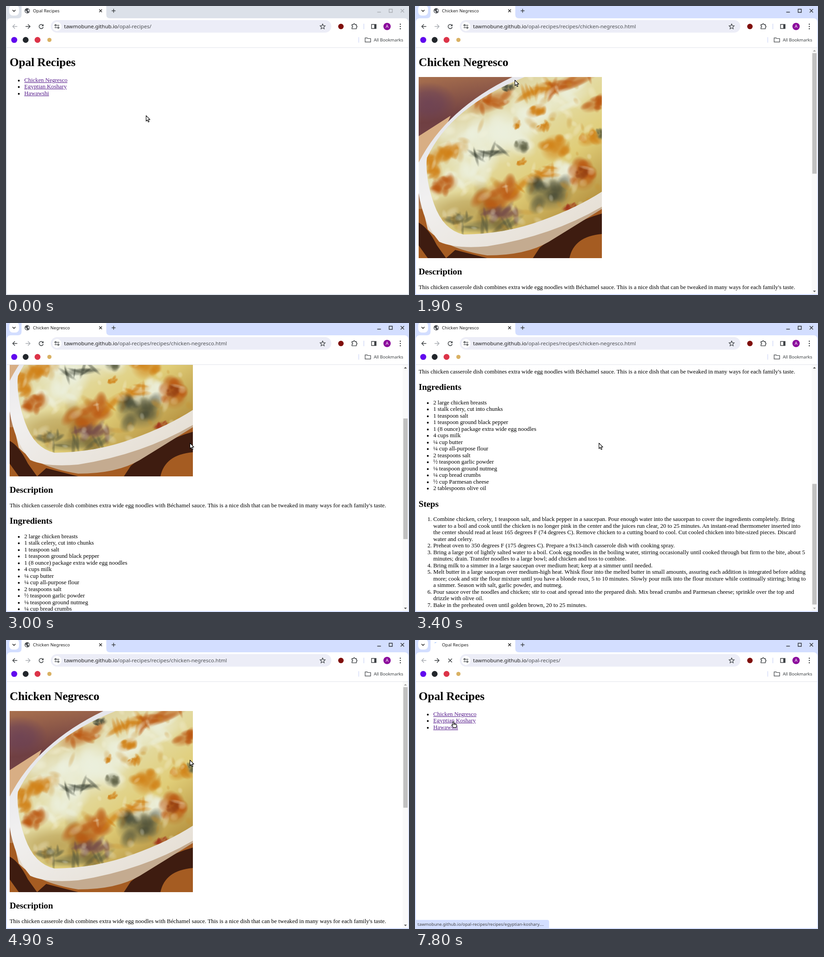
An HTML page with a canvas for the animation above (8000 ms loop, 882 px wide and 635 px high).

```html
<!DOCTYPE html>
<html lang="en">
<head>
<meta charset="utf-8">
<title>Opal Recipes</title>
<style>
html, body { margin: 0; width: 100%; height: 100%; overflow: hidden; background: #fff; }
#ui, #top { position: absolute; left: 0; top: 0; }
#view { position: absolute; left: 1.6px; top: 91.6px; width: 866.4px; height: 541.4px; overflow: hidden; }
.page { position: absolute; left: 0; top: 0; width: 853.6px; padding: 0 6.4px; display: flow-root;
  font: 12.84px/14.5px "Liberation Serif", "Times New Roman", serif; color: #000; }
h1 { font-size: 25.6px; line-height: 30px; margin: .67em 0; }
h2 { font-size: 19.2px; line-height: 21.6px; margin: .83em 0; }
p, ul, ol { margin: 12.8px 0; }
ul, ol { padding-left: 32px; }
.page > h1 + ul { margin-top: 0; }
a { color: #551a8b; text-decoration: underline; }
</style>
</head>
<body>
<canvas id="ui" width="882" height="635"></canvas>
<div id="view">
  <div class="page" id="index">
    <h1>Opal Recipes</h1>
    <ul>
      <li><a>Chicken Negresco</a></li>
      <li><a>Egyptian Koshary</a></li>
      <li><a>Hawawshi</a></li>
    </ul>
  </div>
  <div class="page" id="recipe">
    <h1>Chicken Negresco</h1>
    <canvas id="photo" width="401" height="398" style="width:401px;height:398px"></canvas>
    <h2>Description</h2>
    <p>This chicken casserole dish combines extra wide egg noodles with Béchamel sauce. This is a nice dish that can be tweaked in many ways for each family's taste.</p>
    <h2>Ingredients</h2>
    <ul>
      <li>2 large chicken breasts</li>
      <li>1 stalk celery, cut into chunks</li>
      <li>1 teaspoon salt</li>
      <li>1 teaspoon ground black pepper</li>
      <li>1 (8 ounce) package extra wide egg noodles</li>
      <li>4 cups milk</li>
      <li>¼ cup butter</li>
      <li>¼ cup all-purpose flour</li>
      <li>2 teaspoons salt</li>
      <li>½ teaspoon garlic powder</li>
      <li>⅛ teaspoon ground nutmeg</li>
      <li>¼ cup bread crumbs</li>
      <li>½ cup Parmesan cheese</li>
      <li>2 tablespoons olive oil</li>
    </ul>
    <h2>Steps</h2>
    <ol>
      <li>Combine chicken, celery, 1 teaspoon salt, and black pepper in a saucepan. Pour enough water into the saucepan to cover the ingredients completely. Bring water to a boil and cook until the chicken is no longer pink in the center and the juices run clear, 20 to 25 minutes. An instant-read thermometer inserted into the center should read at least 165 degrees F (74 degrees C). Remove chicken to a cutting board to cool. Cut cooled chicken into bite-sized pieces. Discard water and celery.</li>
      <li>Preheat oven to 350 degrees F (175 degrees C). Prepare a 9x13-inch casserole dish with cooking spray.</li>
      <li>Bring a large pot of lightly salted water to a boil. Cook egg noodles in the boiling water, stirring occasionally until cooked through but firm to the bite, about 5 minutes; drain. Transfer noodles to a large bowl; add chicken and toss to combine.</li>
      <li>Bring milk to a simmer in a large saucepan over medium heat; keep at a simmer until needed.</li>
      <li>Melt butter in a large saucepan over medium-high heat. Whisk flour into the melted butter in small amounts, assuring each addition is integrated before adding more; cook and stir the flour mixture until you have a blonde roux, 5 to 10 minutes. Slowly pour milk into the flour mixture while continually stirring; bring to a simmer. Season with salt, garlic powder, and nutmeg.</li>
      <li>Pour sauce over the noodles and chicken; stir to coat and spread into the prepared dish. Mix bread crumbs and Parmesan cheese; sprinkle over the top and drizzle with olive oil.</li>
      <li>Bake in the preheated oven until golden brown, 20 to 25 minutes.</li>
    </ol>
  </div>
</div>
<canvas id="top" width="882" height="635"></canvas>
<script>
const $ = id => document.getElementById(id);
const ui = $('ui').getContext('2d'), top2d = $('top').getContext('2d');
const SANS = '"Noto Sans", "Open Sans", sans-serif';
const HOST = 'tawmobune.github.io', ROOT = '/opal-recipes/';
const INK = '#3c4043', PALE = '#a9adb3', MAX = 511, NOTCH = 72.4;

// ---- drawing helpers ----
function text(c, s, x, y, size, color) {
  c.font = size + 'px ' + SANS;
  c.fillStyle = color;
  c.fillText(s, x, y);
  return x + c.measureText(s).width;
}
function rect(c, x, y, w, h, color, r = 0) {
  c.fillStyle = color;
  c.beginPath();
  c.roundRect(x, y, w, h, r);
  c.fill();
}
function dot(c, x, y, r, color) {
  c.fillStyle = color;
  c.beginPath();
  c.arc(x, y, r, 0, 7);
  c.fill();
}
function line(c, d, x, y, color, width = 1.4) {
  c.save();
  c.translate(x, y);
  c.strokeStyle = color;
  c.lineWidth = width;
  c.stroke(new Path2D(d));
  c.restore();
}
function shape(c, d, x, y, color) {
  c.save();
  c.translate(x, y);
  c.fillStyle = color;
  c.fill(new Path2D(d));
  c.restore();
}

// ---- photo ----
function paintPhoto() {
  const c = $('photo').getContext('2d');
  let seed = 7;
  const rnd = () => (seed = seed * 16807 % 2147483647) / 2147483647;
  const fade = (x0, y0, x1, y1, ...cols) => {
    const g = c.createLinearGradient(x0, y0, x1, y1);
    cols.forEach((k, i) => g.addColorStop(i / (cols.length - 1), k));
    return g;
  };
  const blob = (x, y, rx, ry, rot, rgb, a) => {
    c.save();
    c.translate(x, y);
    c.rotate(rot);
    c.scale(rx, ry);
    const g = c.createRadialGradient(0, 0, 0, 0, 0, 1.25);
    g.addColorStop(0, `rgba(${rgb},${a})`);
    g.addColorStop(.5, `rgba(${rgb},${a * .75})`);
    g.addColorStop(1, `rgba(${rgb},0)`);
    c.fillStyle = g;
    c.fillRect(-1.3, -1.3, 2.6, 2.6);
    c.restore();
  };
  // an uneven spot: one soft core with smaller blobs scattered over it
  const patch = (x, y, w, h, rot, rgb, a = .6) => {
    blob(x, y, w, h, rot, rgb, a);
    for (let i = 0; i < 9; i++) {
      const u = (rnd() * 2 - 1) * w * .85, v = (rnd() * 2 - 1) * h * .85, k = .25 + rnd() * .3;
      blob(x + u * Math.cos(rot) - v * Math.sin(rot), y + u * Math.sin(rot) + v * Math.cos(rot),
        w * k, h * k, rnd() * 3, rgb, a);
    }
  };

  c.fillStyle = fade(0, 0, 60, 398, '#a8704e', '#6f3f42', '#7a4a50', '#c08a54', '#7a3d18');
  c.fillRect(0, 0, 401, 398);
  blob(20, 55, 50, 35, 0, '96,58,92', .6);
  shape(c, 'M0 130L70 85L30 180L0 190Z', 0, 0, '#d8ae84');
  shape(c, 'M0 290L401 270V398H0Z', 0, 0, '#a55c22');
  shape(c, 'M0 320Q20 330 40 370L60 398H20L0 370ZM80 380L150 398H60ZM265 375Q330 320 401 300V345Q340 350 330 398H250Z', 0, 0, '#3e1c10');
  // dish side, then rim, then filling
  shape(c, 'M0 250L20 335Q60 378 150 392Q235 392 285 362Q340 328 401 290V255Z', 0, 0,
    fade(0, 300, 60, 398, '#efe6da', '#e2d6c6', '#c4ab90'));
  shape(c, 'M205 0Q60 70 0 188V255Q10 320 45 362Q80 378 150 372Q290 350 401 285V0Z', 0, 0,
    fade(0, 0, 250, 398, '#dcdde6', '#f1f0f0', '#e6dfd4'));
  c.save();
  c.clip(new Path2D('M232 0Q70 65 18 178Q14 225 34 280Q54 336 98 346Q190 345 270 315Q345 288 401 252V0Z'));
  c.fillStyle = fade(60, 40, 300, 360, '#d8c890', '#e4dfb0', '#e0cd78', '#b08a38');
  c.fillRect(0, 0, 401, 398);
  patch(110, 295, 90, 35, 0, '160,128,56', .5);
  [[190, 125, 75, 50], [105, 150, 45, 60], [300, 55, 75, 25], [300, 215, 45, 25], [110, 215, 50, 25]]
    .forEach(([x, y, w, h]) => patch(x, y, w, h, -.4, '236,240,222'));
  [[158, 55, 46, 17], [257, 74, 20, 12], [298, 156, 27, 25], [357, 215, 27, 30], [373, 136, 22, 13],
   [273, 110, 16, 8], [172, 262, 48, 24], [55, 168, 42, 16], [32, 198, 15, 28], [385, 60, 26, 13],
   [262, 28, 45, 11], [255, 222, 50, 12], [55, 238, 28, 17], [225, 188, 11, 6], [215, 106, 9, 6], [335, 10, 60, 13]]
    .forEach(([x, y, w, h], i) => patch(x, y, w, h, -.4, i % 3 ? '208,126,18' : '186,86,16'));
  [[285, 255, 44, 32], [150, 326, 66, 12], [225, 151, 15, 13], [155, 168, 38, 7], [88, 312, 28, 9], [398, 125, 9, 12], [198, 24, 14, 7]]
    .forEach(([x, y, w, h], i) => patch(x, y, w, h, -.1, i % 3 ? '84,86,58' : '58,64,50', .5));
  patch(180, 297, 42, 12, 0, '116,74,72');
  patch(356, 212, 13, 14, 0, '150,65,18');
  patch(330, 286, 16, 7, -.3, '160,52,28');
  for (let i = 0; i < 130; i++)
    blob(20 + rnd() * 380, rnd() * 340, 4 + rnd() * 12, 3 + rnd() * 6, rnd() * 3, i % 3 ? '246,244,222' : '200,140,40', .32);
  c.restore();
}

// ---- browser window ----
function toolbar(s) {
  const c = ui, frame = s.active ? '#d3deff' : '#dce1e9';
  rect(c, 0, 0, 882, 635, frame);
  rect(c, 2, 27, 878.5, 606, '#fff', [8, 8, 0, 0]);
  shape(c, 'M26 27Q34 27 34 19V0H219.5V19Q219.5 27 227.5 27Z', 0, 0, '#fff');
  rect(c, 7, -2, 21.5, 23, '#fff', 8);
  line(c, 'M-3.2 -1.5L0 1.7L3.2 -1.5', 17.5, 10.3, '#1f1f1f', 1.5);

  if (s.loading) {
    c.strokeStyle = '#a8c7fa';
    c.lineWidth = 1.6;
    c.beginPath();
    c.arc(46.5, 10.5, 5.3, -2.3, -2.3 + s.loading);
    c.stroke();
  } else {
    dot(c, 46.5, 10.5, 5.7, '#4a4d51');
    shape(c, 'M-4.4 -1L-1.5 .8L-1 3L.2 4.6L-2 4.2Q-4.8 2.4 -4.4 -1ZM-1 -4.4L2.6 -4Q3 -2 1 -1.6L.6 0L3.4 .8L2.6 3L4.6 1.6Q5 -2 3 -4Z', 46.5, 10.5, '#e8eaed');
  }
  text(c, s.recipe ? 'Chicken Negresco' : 'Opal Recipes', 59, 14, 9.6, '#1f1f1f');
  line(c, 'M-3 -3L3 3M3 -3L-3 3', 207, 10.5, '#1f1f1f', 1.3);
  line(c, 'M-4.2 0H4.2M0 -4.2V4.2', 235.5, 10.5, INK, 1.4);

  const win = s.active ? '#303338' : PALE;
  line(c, 'M-4 0H4', 816.5, 13.5, win, 1.5);
  line(c, 'M-3.5 -3.5H3.5V3.5H-3.5Z', 842, 10.5, win, 1.4);
  line(c, 'M-3.7 -3.7L3.7 3.7M3.7 -3.7L-3.7 3.7', 867.5, 10.5, win, 1.4);

  if (s.hover) dot(c, 19.5, 45, 13.5, '#ebebed');
  line(c, 'M5.2 0H-4.4M0 -4.8L-4.8 0L0 4.8', 19.5, 45, s.recipe ? INK : PALE);
  line(c, 'M-5.2 0H4.4M0 -4.8L4.8 0L0 4.8', 48, 45, s.recipe ? PALE : INK);
  if (s.loading) line(c, 'M-4 -4L4 4M4 -4L-4 4', 77, 45, INK, 1.5);
  else {
    line(c, 'M4.5 1.2A4.6 4.6 0 1 1 3.4 -3.1L4.3 -2', 77, 45, INK, 1.5);
    shape(c, 'M5.2 -5.3V-.8H.7Z', 77, 45, INK);
  }

  rect(c, 98, 31, 614, 27.5, '#ecedf7', 13.75);
  dot(c, 111.5, 45, 10, '#fff');
  line(c, 'M.2 -2.6H5M-5 2.6H-.2', 111.5, 45, INK, 1.5);
  line(c, 'M-4.6 -2.6a1.6 1.6 0 1 0 3.2 0a1.6 1.6 0 1 0 -3.2 0M1.4 2.6a1.6 1.6 0 1 0 3.2 0a1.6 1.6 0 1 0 -3.2 0', 111.5, 45, INK, 1.4);
  const x = text(c, HOST, 127, 49, 11.53, '#1f1f1f');
  text(c, ROOT + (s.recipe ? 'recipes/chicken-negresco.html' : ''), x, 49, 11.53, '#4c4f53');

  line(c, 'M0 -5.6L1.6 -1.9L5.6 -1.5L2.6 1.2L3.5 5.2L0 3.1L-3.5 5.2L-2.6 1.2L-5.6 -1.5L-1.6 -1.9Z', 693, 45, INK, 1.2);
  dot(c, 733, 45, 6, '#7f0d0a');
  line(c, 'M-5.3 -3.8H-2.2A1.7 1.7 0 0 1 1.2 -3.8H4.2V-.8A1.7 1.7 0 0 1 4.2 2.6V5.6H-5.3V2.6A1.7 1.7 0 0 0 -5.3 -.8Z', 762.5, 44.5, INK, 1.4);
  rect(c, 782.5, 39, 1.5, 12, '#d3dcf8');
  line(c, 'M-5 -4.5H5V4.5H-5Z', 805, 45, INK, 1.4);
  rect(c, 806, 40.5, 4, 9, INK);
  dot(c, 834, 45, 8, '#8b0a9c');
  text(c, 'A', 830.9, 48.4, 9.6, '#fff');
  [40, 45, 50].forEach(y => dot(c, 863, y, 1.35, INK));

  dot(c, 18, 74.5, 6.6, '#6108ee');
  dot(c, 43, 74.5, 6.4, '#22262b');
  dot(c, 69, 74.5, 6.5, '#dc3348');
  dot(c, 95, 74.5, 4.6, '#d9b163');
  rect(c, 771.3, 68.5, 1.4, 12, '#d3dcf8');
  line(c, 'M-6 -4.4H-1.6L-.2 -3H6V4.6H-6Z', 792, 74.5, INK, 1.2);
  text(c, 'All Bookmarks', 805, 78, 9.55, '#3c4043');
  rect(c, 2, 91, 878.5, 1, '#e1e3ea');

  if (s.recipe) {
    rect(c, 868, 92, 12.5, 541, '#f9f9f9');
    rect(c, 869.5, 103.5 + s.scroll * .4893, 9.5, 265, '#c1c1c1');
    shape(c, 'M-3.2 1.6L0 -1.8L3.2 1.6Z', 874.2, 98.3, s.scroll ? '#505050' : '#a3a3a3');
    shape(c, 'M-3.2 -1.6L0 1.8L3.2 -1.6Z', 874.2, 627, s.scroll < MAX ? '#505050' : '#a3a3a3');
  }
}

const ARROW = 'M.6 .8V13L3.4 10.4L5.3 15L7.3 14.2L5.4 9.6H9.2Z';
const HAND = 'M-1.2 1.2Q0 -.2 1.2 1.2V5.2Q2.4 4.5 3.2 5.5Q4.4 4.9 5.2 6Q6.8 5.6 7 7.2V10.5Q6.6 12 6 13.4H-.2Q-1 11.5 -3 9.6Q-4.4 7.8 -3.2 7.2Q-2.2 7 -1.2 8.4Z';
function overlay(s) {
  const c = top2d;
  c.clearRect(0, 0, 882, 635);
  if (s.status) {
    rect(c, 0, 615, 293.5, 20, '#d3deff', [0, 4, 0, 0]);
    text(c, HOST + ROOT + 'recipes/' + s.status, 5.5, 628, 9.4, '#474747');
  }
  const d = s.hand ? HAND : ARROW;
  c.lineJoin = 'round';
  shape(c, d, s.x, s.y, '#fff');
  line(c, d, s.x, s.y, '#000', 1.1);
  if (s.hand) line(c, 'M1.2 5V8M3.2 5.6V8M5.2 6.2V8', s.x, s.y, '#000', .8);
}

// ---- timeline ----
const pointer = [
  [300, 306, 240], [900, 121, 163], [1600, 121, 163], [1700, 140, 160], [1900, 218, 162],
  [2300, 402, 263], [5100, 402, 263], [5800, 20, 42], [5900, 20, 42], [6000, 22, 43],
  [6300, 22, 43], [6400, 23, 44], [6500, 23, 44], [6600, 72, 151], [6800, 72, 151],
  [6900, 83, 193], [7100, 83, 193], [7500, 84, 179]
];
const wheel = [[2700, 1], [2800, 2], [3000, 3], [3100, 4], [3200, 6], [3400, 8],
  [4200, 6.06], [4400, 4], [4500, 2], [4900, 0]];

function place(t) {
  const i = pointer.findIndex(p => p[0] > t);
  if (i === 0) return pointer[0].slice(1);
  if (i < 0) return pointer.at(-1).slice(1);
  const [a, ax, ay] = pointer[i - 1], [b, bx, by] = pointer[i], k = (t - a) / (b - a);
  return [ax + (bx - ax) * k, ay + (by - ay) * k].map(Math.round);
}
function stateAt(t) {
  const within = (a, b) => t >= a && t < b;
  const [x, y] = place(t);
  const notches = wheel.reduce((n, [at, v]) => t >= at ? v : n, 0);
  return {
    x, y,
    scroll: Math.min(MAX, Math.round(notches * NOTCH)),
    active: t >= 1200,
    recipe: within(1500, 6200),
    loading: within(1200, 1500) ? .5 + (t - 1200) / 200 : t >= 7700 ? .4 + (t - 7700) / 300 : 0,
    hover: within(5700, 6600),
    hand: within(900, 1700) || t >= 6900,
    status: within(1200, 1700) ? 'chicken-negresc...' : t >= 7700 ? 'egyptian-koshary....' : ''
  };
}

let shown = -1;
const start = performance.now();
function tick() {
  const t = Math.floor((performance.now() - start) % 8000 / 100) * 100;
  if (t !== shown) {
    shown = t;
    const s = stateAt(t);
    toolbar(s);
    overlay(s);
    $('index').style.display = s.recipe ? 'none' : '';
    $('recipe').style.display = s.recipe ? '' : 'none';
    $('recipe').style.top = -s.scroll + 'px';
  }
  requestAnimationFrame(tick);
}
paintPhoto();
tick();
</script>
</body>
</html>
```
